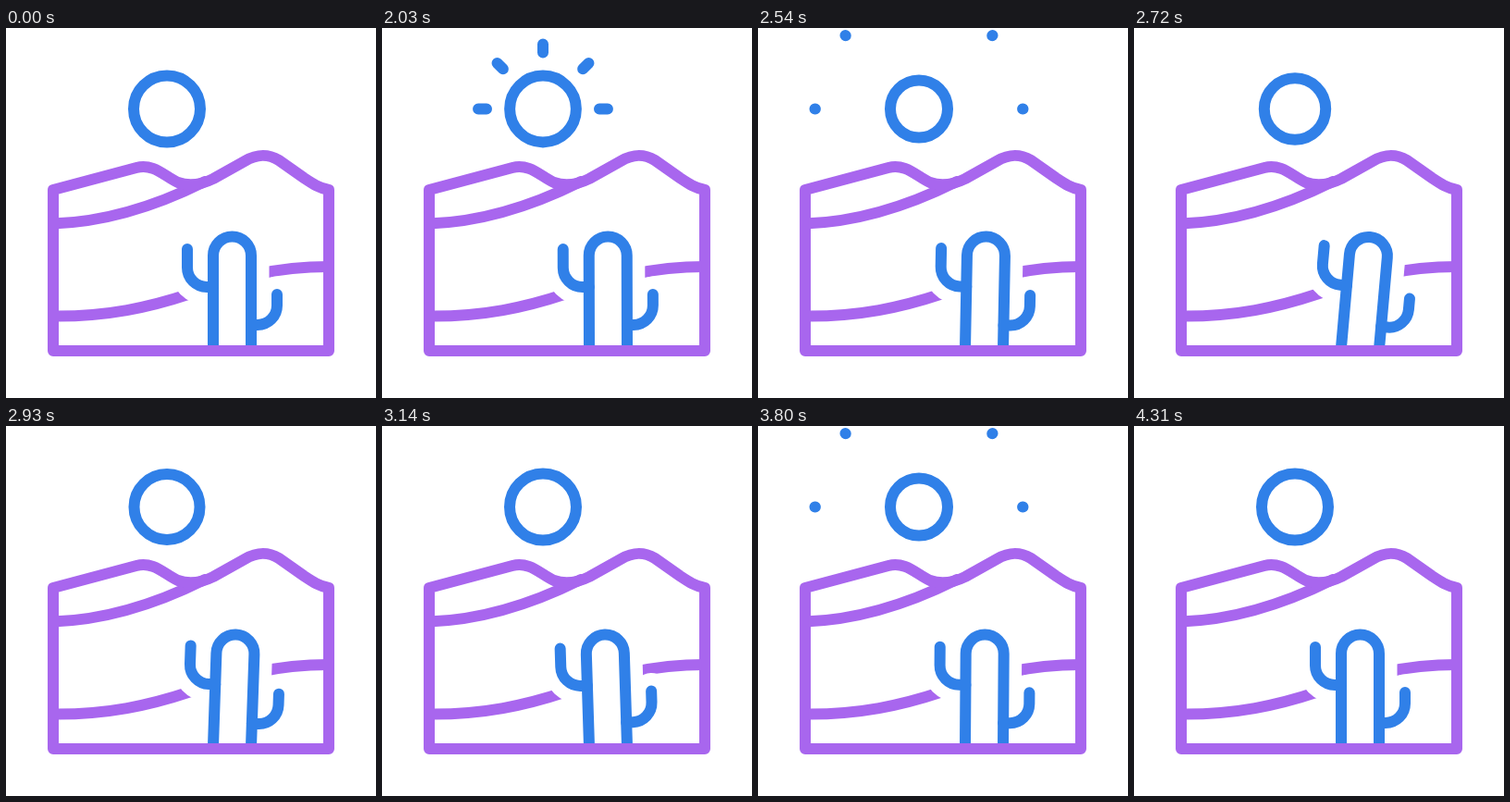
An HTML page with a canvas that plays this animation: 400x400 px, repeating every 4340 ms.

```html
<!DOCTYPE html>
<html lang="en">
<head>
<meta charset="utf-8">
<title>Desert</title>
<style>
  html, body { margin: 0; height: 100%; overflow: hidden; background: #fff; }
  canvas { display: block; width: 400px; height: 400px; }
</style>
</head>
<body>
<canvas id="stage" width="400" height="400"></canvas>
<script>
const ctx = document.getElementById('stage').getContext('2d');
const BLUE = '#3080e8', PURPLE = '#a866ee';
const LOOP = 4340, REST = 2000, STEP = 30, SUN_CYCLE = 1260;

const frame = new Path2D(
  'M51 175L141 151C160 146 172 161 186 167C200 172 212 169 224 163L258 144' +
  'C272 136 283 136 295 143L322 162C331 168 338 173 349 175V349H51Z');
const upperDune = new Path2D('M51 211.5C100 210 155 196 215 166');
const lowerDune = new Path2D('M51 311.5C110 312 155 302 200 287C250 270 290 258 349 258');
const trunk = new Path2D('M224 350V246a20.5 20.5 0 0 1 41 0V350');
const arms = new Path2D('M196 239V259a21 21 0 0 0 21 21H224M293 288V300a21 21 0 0 1 -21 21H265');

// [ms, degrees]: a damped sway
const sway = [[0, 0], [300, -5], [720, 5.1], [1170, -1.9], [1600, 1], [2000, -0.2], [2310, 0]];

const clamp = x => Math.min(1, Math.max(0, x));
const smooth = x => (x = clamp(x), x * x * (3 - 2 * x));
const easeOut = x => 1 - (1 - clamp(x)) ** 2;

function swayAt(ms) {
  const i = sway.findIndex(key => key[0] > ms);
  if (i < 1) return 0;
  const [t0, a0] = sway[i - 1], [t1, a1] = sway[i];
  return a0 + (a1 - a0) * smooth((ms - t0) / (t1 - t0));
}

function stroke(path, color, width = 12) {
  ctx.strokeStyle = color;
  ctx.lineWidth = width;
  ctx.stroke(path);
}

function drawSun(ms) {
  const shrink = smooth(ms / 360) - smooth((ms - 360) / 690);
  const tip = easeOut(ms / 330), tail = easeOut((ms - 240) / 330);
  const path = new Path2D();
  path.arc(174, 87.5, 36 - 6 * shrink, 0, 2 * Math.PI);
  if (tip > tail) {
    for (let i = 0; i < 5; i++) {
      const angle = Math.PI * (1 + i / 4);
      const point = part => {
        const r = 61 + 51.5 * part;
        return [174 + r * Math.cos(angle), 87.5 + r * Math.sin(angle)];
      };
      path.moveTo(...point(tail));
      path.lineTo(...point(tip));
    }
  }
  stroke(path, BLUE);
}

function drawCactus(ms) {
  ctx.save();
  ctx.translate(244.5, 346);
  ctx.rotate(swayAt(ms) * Math.PI / 180);
  ctx.translate(-244.5, -346);
  // White halo opens the gap in the dune behind
  for (const [color, width] of [['#fff', 39], [BLUE, 12]]) {
    ctx.lineCap = 'butt';
    stroke(trunk, color, width);
    ctx.lineCap = 'round';
    stroke(arms, color, width);
    if (color === '#fff') {
      ctx.fillStyle = color;
      ctx.fill(trunk);
    }
  }
  ctx.restore();
}

function draw(now) {
  const ms = Math.max(0, STEP * Math.floor((now % LOOP - REST) / STEP));
  ctx.clearRect(0, 0, 400, 400);
  ctx.lineCap = ctx.lineJoin = 'round';
  stroke(lowerDune, PURPLE);
  drawCactus(ms);
  stroke(upperDune, PURPLE);
  stroke(frame, PURPLE);
  drawSun(ms % SUN_CYCLE);
}

let start;
function tick(now) {
  start ??= now;
  draw(now - start);
  requestAnimationFrame(tick);
}
requestAnimationFrame(tick);
</script>
</body>
</html>
```
